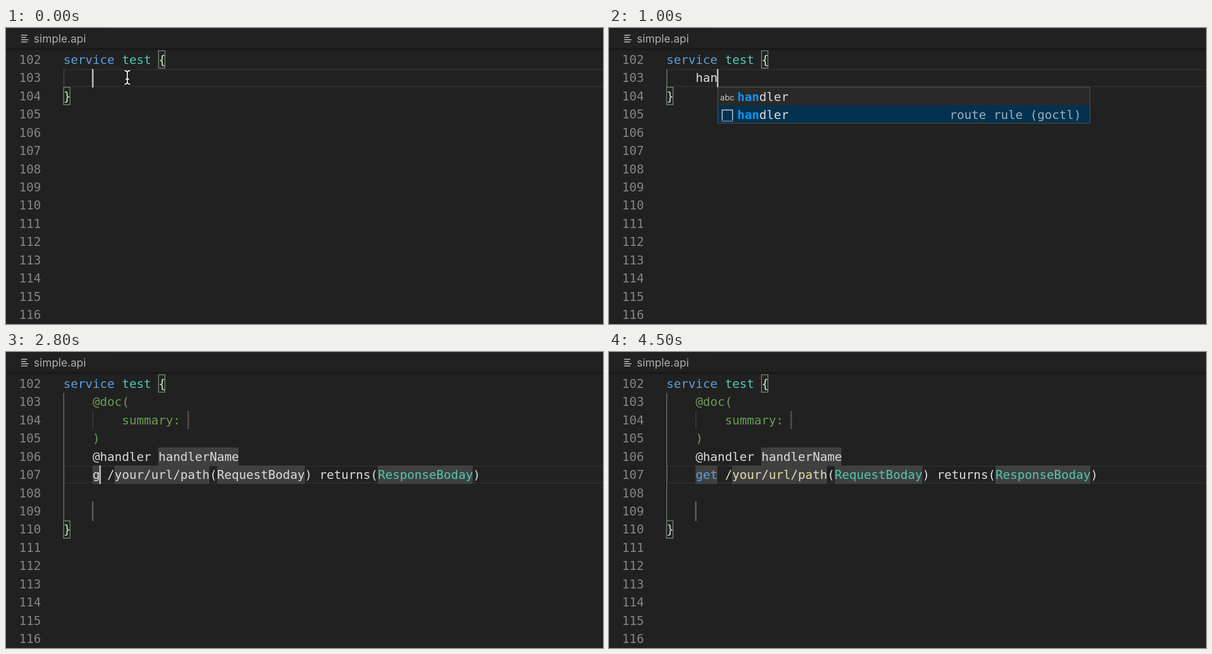
Animation, 1063 px wide and 527 px high, one loop 4710 ms. Source, as an HTML page with a canvas:

```html
<!DOCTYPE html>
<html lang="en">
<head>
<meta charset="utf-8">
<title>simple.api</title>
<style>
html, body { margin: 0; width: 100%; height: 100%; overflow: hidden; background: #212121; }
canvas { display: block; }
</style>
</head>
<body>
<canvas id="stage" width="1063" height="527"></canvas>
<script>
const ctx = document.getElementById('stage').getContext('2d');
const W = 1063, H = 527, LOOP = 4710;
const LEFT = 102.2, CHAR = 13.022, TOP = 40.1, ROW = 32.46, FIRST = 102;
const MONO = '"DejaVu Sans Mono", monospace';
const SANS = 'Inter, sans-serif';
const C = {
  bg: '#212121', text: '#dcdcdc', blue: '#5a9fd9', teal: '#4ec9b0', green: '#6a9e56',
  yellow: '#dfdfaf', number: '#858585', guide: '#404040', guideOn: '#707070',
  hole: '#404040', select: '#43607f', caret: '#b4b5b3', match: '#0a97f5'
};

const colX = col => LEFT + col * CHAR;
const rowY = line => TOP + (line - FIRST) * ROW;

function rect(x, y, w, h, color) {
  ctx.fillStyle = color;
  ctx.fillRect(x, y, w, h);
}

function mono(str, x, y, color, bold) {
  ctx.font = (bold ? 'bold ' : '') + '21.63px ' + MONO;
  ctx.fillStyle = color;
  [...str].forEach((ch, i) => { if (ch !== ' ') ctx.fillText(ch, x + i * CHAR, y); });
}

// Runs are [text, color] pairs laid end to end.
function code(line, col, ...runs) {
  for (const [str, color] of runs) {
    mono(str, colX(col), rowY(line) + 23.7, color);
    col += str.length;
  }
}

function hole(line, col, len, selected) {
  ctx.fillStyle = selected ? C.select : C.hole;
  ctx.beginPath();
  ctx.roundRect(Math.round(colX(col)), Math.round(rowY(line)), Math.round(len * CHAR), 33, selected ? 4 : 1);
  ctx.fill();
}

function guide(col, from, to, active) {
  const y = Math.round(rowY(from));
  rect(Math.round(colX(col)), y, 1.5, Math.round(rowY(to + 1)) - y, active ? C.guideOn : C.guide);
}

function currentLine(line) {
  const y = Math.round(rowY(line));
  rect(103, y, W, 2, '#2d2d2d');
  rect(103, y + 30, W, 2, '#2d2d2d');
  rect(103, y, 2, 32, '#2d2d2d');
}

function bracketBox(line, col) {
  const x = Math.round(colX(col)) + .5, y = Math.round(rowY(line)) + .5;
  rect(x, y, 11.5, 31, 'rgba(0,100,0,.1)');
  ctx.strokeStyle = '#858a85';
  ctx.lineWidth = 1.3;
  ctx.strokeRect(x, y, 11.5, 31);
}

function caret(line, col) {
  rect(Math.round(colX(col) - 1), Math.round(rowY(line)), 3, 33, C.caret);
}

function header() {
  rect(180, 0, W - 180, 1, '#2a2a2a');
  const shade = ctx.createLinearGradient(0, 35, 0, 41);
  shade.addColorStop(0, 'rgba(0,0,0,0)');
  shade.addColorStop(.35, 'rgba(0,0,0,.35)');
  shade.addColorStop(1, 'rgba(0,0,0,0)');
  rect(0, 35, W, 6, shade);
  [11, 9, 13, 11].forEach((w, i) => rect(27, 12 + i * 4, w, 1.6, '#c0c0c0'));
  ctx.font = '19.4px ' + SANS;
  ctx.fillStyle = '#adadad';
  ctx.fillText('simple.api', 49.5, 26);
}

function pointer(x, y) {
  const path = () => {
    ctx.beginPath();
    ctx.moveTo(x - 5, y - 12);
    ctx.quadraticCurveTo(x, y - 12, x, y - 8);
    ctx.quadraticCurveTo(x, y - 12, x + 5, y - 12);
    ctx.moveTo(x, y - 9);
    ctx.lineTo(x, y + 9);
    ctx.moveTo(x - 5, y + 12);
    ctx.quadraticCurveTo(x, y + 12, x, y + 8);
    ctx.quadraticCurveTo(x, y + 12, x + 5, y + 12);
    ctx.moveTo(x - 3, y + 3);
    ctx.lineTo(x + 3, y + 3);
  };
  for (const [w, color] of [[4, '#111'], [1.8, '#fff']]) {
    ctx.lineWidth = w;
    ctx.strokeStyle = color;
    path();
    ctx.stroke();
  }
}

function snippetIcon(x, y) {
  ctx.strokeStyle = '#d4d4d4';
  ctx.lineWidth = 1.5;
  ctx.beginPath();
  ctx.moveTo(x, y + 18);
  ctx.lineTo(x, y);
  ctx.lineTo(x + 18.5, y);
  ctx.lineTo(x + 18.5, y + 18);
  ctx.stroke();
  for (let i = 0; i < 7; i++) rect(x - .7 + i * 3, y + 19, 1.6, 1.6, '#d4d4d4');
}

function suggest(typed) {
  const words = typed.length === 1 ? ['handler', 'host', 'handler'] : ['handler', 'handler'];
  const x = Math.round(colX(4 + typed.length)), y = 105, last = words.length - 1;
  const h = words.length * 32.3 + .5;
  rect(x, y, 664, h, '#292929');
  const selY = Math.round(y + 1 + last * ROW);
  rect(x, selY, 663, y + h - selY, '#02324f');
  ctx.strokeStyle = '#4a4a4a';
  ctx.lineWidth = 1.3;
  ctx.strokeRect(x + .5, y + .5, 663, Math.round(h) - 1);
  words.forEach((word, i) => {
    const base = y + 25 + i * ROW;
    if (i === last) {
      snippetIcon(x + 8.5, base - 16.5);
      mono('route rule (goctl)', x + 413.5, base, '#9badb9');
    } else {
      ctx.font = '14.5px ' + SANS;
      ctx.fillStyle = '#c8c8c8';
      ctx.fillText('abc', x + 5, base - 1.5);
    }
    mono(typed, x + 35.5, base, C.match, true);
    mono(word.slice(typed.length), x + 35.5 + typed.length * CHAR, base, C.text);
  });
}

function lineNumbers() {
  for (let n = FIRST; n <= 116; n++) mono(String(n), 23.3, rowY(n) + 23.7, C.number);
}

function opening() {
  code(102, 0, ['service', C.blue], [' test', C.teal], [' {', C.text]);
}

function typing(t) {
  const typed = 'han'.slice(0, t < 300 ? 0 : t < 570 ? 1 : t < 670 ? 2 : 3);
  currentLine(103);
  guide(0, 103, 103, typed);
  bracketBox(102, 13);
  bracketBox(104, 0);
  opening();
  code(103, 4, [typed, C.text]);
  code(104, 0, ['}', C.text]);
  caret(103, 4 + typed.length);
  if (t >= 430) suggest(typed);
  if (t < 30) pointer(216, 88);
}

function snippet(t) {
  const onDoc = t < 1800, onName = !onDoc && t < 2170, onMethod = !onDoc && !onName && t < 2800;
  const edited = t >= 2800, valid = t >= 3000;
  const method = !edited ? 'http_method' : 'get'.slice(0, t < 2900 ? 1 : valid ? 3 : 2);
  const end = 4 + method.length;

  if (onDoc) currentLine(104);
  if (edited) currentLine(107);
  guide(0, 103, 109, edited);
  guide(4, 104, 104, onDoc);

  hole(106, 13, 11, onName);
  hole(107, 4, method.length, onMethod);
  hole(107, end + 2, 13);
  hole(107, end + 16, 12);
  hole(107, end + 38, 13);
  rect(323, 105, 3, 32, '#4a4a4a');
  rect(153, 266, 3, 35, '#565656');

  if (onDoc || edited) {
    bracketBox(102, 13);
    bracketBox(110, 0);
  }
  opening();
  code(103, 4, ['@doc(', C.green]);
  code(104, 8, ['summary:', C.green]);
  code(105, 4, [')', C.green]);
  code(106, 4, ['@handler handlerName', C.text]);
  code(107, 4,
    [method, valid ? C.blue : C.text],
    [' /your/url/path', valid ? C.yellow : C.text],
    ['(', C.text], ['RequestBoday', valid ? C.teal : C.text],
    [') returns(', C.text], ['ResponseBoday', C.teal], [')', C.text]);
  code(110, 0, ['}', C.text]);

  if (onDoc) { if (t < 1530) caret(104, 17); }
  else if (onName) caret(106, 24);
  else if (onMethod) { if (t < 2630) caret(107, end); }
  else if (!valid || Math.floor((t - 3000) / 500) % 2 === 0) caret(107, end);
}

function draw(t) {
  rect(0, 0, W, H, C.bg);
  header();
  lineNumbers();
  if (t < 1030) typing(t);
  else snippet(t);
}

const start = performance.now();
function tick() {
  draw((performance.now() - start) % LOOP);
  requestAnimationFrame(tick);
}
tick();
</script>
</body>
</html>
```
